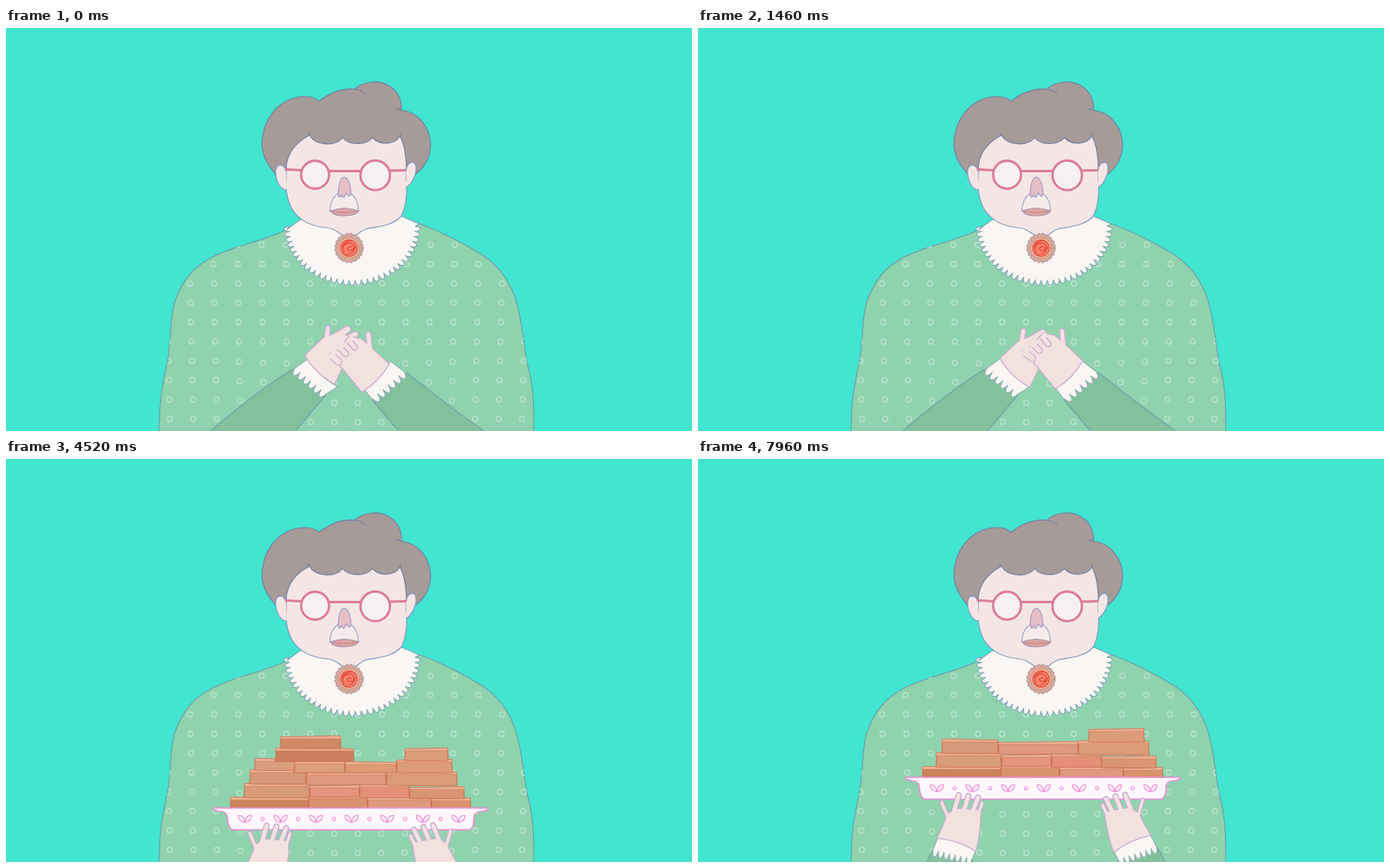
Recreate the animation shown at these times as an HTML page. Size 850 by 500 pixels, loop 8000 ms.

```html
<!DOCTYPE html>
<html lang="en">
<head>
<meta charset="utf-8">
<title>Lady with a tray</title>
<style>
html, body { margin: 0; width: 100%; height: 100%; overflow: hidden; background: #42e5d0; }
svg { display: block; width: 850px; height: 500px; }
</style>
</head>
<body>
<svg id="stage" viewBox="0 0 850 500" fill="none" stroke-linecap="round" stroke-linejoin="round"></svg>
<script>
const LOOP = 8000;
const SKIN = '#f3e1e0', LILAC = '#c6acd0', FACE = '#f5e6e5', SLEEVE = '#83c19d', HAIR = '#a69b99';
const EDGE = '#7f9ac0', SEAM = '#6c9fa8', CREAM = '#faf6f3', LACE = '#8fb0b5', PINK = '#ee8ad6';

const path = (d, fill = 'none', stroke = 'none', w = 1.2) =>
  `<path d="${d}" fill="${fill}" stroke="${stroke}" stroke-width="${w}"/>`;
const circle = (x, y, r, fill, stroke = 'none', w = 1.3) =>
  `<circle cx="${x}" cy="${y}" r="${r}" fill="${fill}" stroke="${stroke}" stroke-width="${w}"/>`;
const group = (id, inner) => `<g id="${id}">${inner}</g>`;

// Lobed edge: edge(u) gives a point and its outward normal.
function scallop(edge, teeth, depth) {
  const pts = [], n = teeth * 12;
  for (let i = 0; i <= n; i++) {
    const [x, y, nx, ny] = edge(i / n);
    const k = depth * Math.abs(Math.sin(Math.PI * i / 12)) ** .6;
    pts.push((x + nx * k).toFixed(1) + ',' + (y + ny * k).toFixed(1));
  }
  return 'L' + pts.join(' ');
}
function line(x1, y1, x2, y2) {
  const dx = x2 - x1, dy = y2 - y1, len = Math.hypot(dx, dy);
  return u => [x1 + dx * u, y1 + dy * u, -dy / len, dx / len];
}
const arc = (cx, cy, rx, ry, from, to) => u => {
  const a = from + (to - from) * u, c = Math.cos(a), s = Math.sin(a);
  return [cx + rx * c, cy + ry * s, c, s];
};

// Palm and fingers merged under one outline; a finger is [x1, y1, x2, y2, width].
function hand(palm, fingers) {
  const pass = (color, grow) => path(palm, color, grow ? color : 'none', grow) +
    fingers.map(([a, b, c, d, w]) => path(`M${a},${b}L${c},${d}`, 'none', color, w + grow)).join('');
  return pass(LILAC, 2.6) + pass(SKIN, 0);
}

const bodyPath = 'M190,502C189,455 197,432 201,408C205,380 203,362 209,340C219,312 232,297 254,285' +
  'C285,269 325,263 350,249L420,230L510,242C535,251 567,267 591,282C615,298 630,322 636,355' +
  'C642,382 642,402 648,425C654,448 654,475 654,502Z';

function dots() {
  let s = '';
  for (let row = 0; row < 10; row++) {
    const gap = 29.9 - .09 * row;
    for (let col = -8; col < 8; col++) {
      const x = 421.3 + gap * (col + .5);
      const bow = row > 5 ? 4 * Math.max(0, 1 - ((x - 421) / 160) ** 2) : 0;
      s += circle(x.toFixed(1), (269 + 24 * row + bow).toFixed(1), 3.2, 'none', '#b9e3cb', 1.4);
    }
  }
  return `<clipPath id="torso"><path d="${bodyPath}"/></clipPath><g clip-path="url(#torso)">${s}</g>`;
}

function lady() {
  const collar = 'M364,238L348,250' + scallop(arc(429, 246, 78, 67, Math.PI, 0), 33, 6.5) +
    'L512,243L489,233Z';
  const face = 'M347,172C346,186 346,202 350,214C355,233 372,246 398,248C411,249 414,258 425,261' +
    'C434,261 436,252 447,249C466,246 481,244 490,233C497,219 497,205 496.5,172L510,125H335Z';
  const hair = 'M334,181C320,166 315,150 318,134C323,104 345,85 371,85C380,85 385,88 388,91' +
    'C401,80 418,74 432,76C441,67 461,63 475,72C487,79 491,92 490,102C511,104 526,124 526,145' +
    'C526,161 518,173 508,181L496,190C497,165 495,146 488,134C482,145 463,146 454,136' +
    'C446,146 425,146 417,136C409,147 384,147 376,133C357,143 348,157 347,174L347,190Z';
  const ears = 'M347,178C345,168 335,167 334,178C334,190 340,201 348,201' +
    'M496,176C497,166 507,163 508,172C509,182 503,193 496,198';
  const brooch = 'M443,273' + scallop(arc(425, 273, 15.5, 16, 0, 2 * Math.PI), 20, 2.4) + 'Z';
  const glasses = '#dc7b9b';
  return path(bodyPath, '#8fd3ae', SEAM) + dots() +
    path(collar, CREAM, '#7fa6b8', 1.1) +
    path(face, FACE, EDGE) + path(hair, HAIR, '#71809f') + path(ears, FACE, EDGE) +
    path('M432,76Q441,77 445,82M490,102Q486,100 483,101M376,133L374,130M488,134L489,131', 'none', '#71809f') +
    path('M347,175.5L366,176.5M400,177.5H439M476,177L495,176.5', 'none', glasses, 2.8) +
    circle(383, 182, 17.3, '#f7f0f2', glasses, 2.9) + circle(457.5, 182.8, 18.3, '#f7f0f2', glasses, 2.9) +
    path('M412,205C404,210 402,218 401,227Q419,222 437,227C436,217 434,210 427,205Z', '#f6ebea', '#94a6c6', 1.1) +
    path('M412,208C411,195 415,185 419,185C425,186 428,198 427,207Q425,211 423,206Q421,203 420,208' +
      'Q418,213 416,207Q413,212 412,208Z', '#e7bfc6', '#9799c0', 1.1) +
    path('M402,227Q419,220 437,227Q433,233 419,233Q405,233 402,227Z', '#e0a4a1', '#9b93ae', 1.1) +
    path('M403,227Q419,231 436,227', 'none', '#b98390', .9) +
    path(brooch, '#d7a99a', '#a98f9c', 1) +
    circle(425, 273, 13, '#efb89b', '#c98f80', .9) +
    circle(425, 273, 10.2, '#f8826a', '#e2503f', 1.2) +
    path('M419,279C415,271 420,266 427,267C434,269 432,277 425,276C421,275 424,270 428,272' +
      'M421,281Q431,281 433,271M417,271Q420,264 428,264', 'none', '#df463a', 1.2);
}

function foldedHands() {
  const cuffL = 'M375,410L356,423' + scallop(line(358, 422, 397, 454), 6, 8) + 'L411,445Q387,432 375,410Z';
  const cuffR = 'M443,447L453,460' + scallop(line(454, 460, 493, 426), 6, 8) + 'L476,413Q463,435 443,447Z';
  const left = hand('M375,410L397,389L422,379L432,400L411,445Q387,432 375,410Z',
    [[401, 391, 403, 376, 5], [410, 388, 427, 378, 7], [422, 392, 437, 384, 6]]);
  const right = hand('M476,413L457,395L442,382L428,379L406,402L443,447Q463,435 476,413Z',
    [[453, 396, 451, 376, 5]]) +
    [[406, 403, 414, 410, 7], [416, 393, 423, 400, 6], [428, 385, 434, 392, 5.5]]
      .map(f => hand('', [f])).join('') +
    path('M409,399L404,403M419,389L414,393M430,381L427,384', 'none', SKIN, 6);
  return path('M250,503Q308,453 354,424L396,456L356,503', SLEEVE, SEAM) +
    path('M596,503Q544,466 497,428L454,462L489,503', SLEEVE, SEAM) +
    path(cuffL, CREAM, LACE) + path(cuffR, CREAM, LACE) +
    group('leftHand', left) + group('rightHand', right);
}

// x, y, width, height, color, time of disappearing
const bricks = [
  [278, 382, 97, 14, '#cb835c'], [375, 380, 73, 15, '#d8936d'], [448, 382, 79, 14, '#e09b7c'], [527, 383, 49, 13, '#d9926b'],
  [295, 365, 81, 17, '#d99c78'], [376, 367, 62, 14, '#e4957c'], [438, 366, 62, 16, '#e39076'], [500, 369, 68, 14, '#d99673'],
  [302, 348, 70, 17, '#d59a78'], [372, 351, 99, 15, '#df9882'], [471, 350, 88, 17, '#da9b76'],
  [484, 335, 69, 16, '#db9d79'], [308, 334, 52, 14, '#da9f7c', 7780], [357, 337, 63, 14, '#db9f79', 7870],
  [420, 338, 64, 13, '#dc9b72', 7960], [494, 321, 54, 15, '#db9d79', 7690],
  [334, 321, 97, 16, '#cb7f5d', 7490], [340, 306, 75, 15, '#cf8a65', 7290]
];

function brick([x, y, w, h, color], i) {
  const tilt = i % 2 ? .5 : -.5, r = x + w, b = y + h;
  const top = `M${x + 1},${y + tilt}Q${x + w / 2},${y + .5} ${r - 1},${y - tilt}`;
  return group('brick' + i,
    path(`${top}L${r},${b}Q${x + w / 2},${b + .5} ${x},${b}Z`, color, '#cf7053', 1.1) +
    path(`${top}L${r},${y + 3}L${x},${y + 3}Z`, '#ecb697', '#d07c5e', .7));
}

function trayHand() {
  const hem = scallop(line(291, 485, 340, 496), 7, 8);
  return path('M281,510Q284,497 291,485L340,496L341,510Z', SLEEVE, SEAM) +
    path('M297,470L291,485' + hem + 'L344,486Q322,472 297,470Z', CREAM, LACE) +
    hand('M297,470Q306,452 309,441L320,434L350,436Q350,462 344,486Q322,472 297,470Z',
      [[309, 443, 302, 426, 3.5], [317, 438, 323, 417, 5], [328, 441, 335, 418, 5],
       [339, 441, 347, 420, 5], [347, 442, 352, 427, 3.5]]);
}

function tray() {
  let s = path('M257,395H597Q598,398 591,399Q582,399 580,405Q580,422 573,422H282Q275,422 274,405' +
    'Q272,399 264,399Q257,398 257,395Z', '#fef8fc', PINK, 1.7);
  for (let i = 0; i < 7; i++) {
    const x = 296 + 44.1 * i;
    s += path(`M${x},413Q${x - 9},411 ${x - 8},404Q${x - 1},404 ${x},413Q${x + 1},404 ${x + 8},404Q${x + 9},411 ${x},413Z`,
      '#fdeef8', PINK, 1.1);
    if (i < 6) s += circle(x + 22, 408.5, 2, 'none', PINK, 1.1);
  }
  return bricks.map(brick).join('') + s + trayHand() +
    `<g transform="rotate(-6 525 425) translate(853 0) scale(-1 1)">${trayHand()}</g>`;
}

const stage = document.getElementById('stage');
stage.innerHTML = '<rect width="850" height="500" fill="#42e5d0"/>' + lady() +
  group('folded', foldedHands()) + group('tray', tray());

const $ = id => document.getElementById(id);
const move = (id, x, y) => $(id).setAttribute('transform', `translate(${x.toFixed(2)} ${y.toFixed(2)})`);
// Value held since `start`, changing every `gap` ms.
const stepped = (t, start, gap, values) =>
  values[Math.max(0, Math.min(values.length - 1, Math.floor((t - start) / gap) + 1))];

const sink = [0, 32, 64, 96, 128, 165];
const rise = [220, 188, 168, 145, 120, 92, 64, 38, 18, 5, 0];

function draw(t) {
  const k = Math.max(0, Math.min(16, Math.floor((t - 500) / 60))) / 16;
  const open = 1 - k * k * (3 - 2 * k);
  move('leftHand', -4 * open, -4 * open);
  move('rightHand', -2 * open, 4 * open);
  move('folded', 0, stepped(t, 3460, 80, sink));
  move('tray', 0, stepped(t, 3980, 90, rise));
  bricks.forEach((b, i) => {
    if (b[5]) $('brick' + i).setAttribute('visibility', t < b[5] ? 'visible' : 'hidden');
  });
}

const began = performance.now();
function tick() {
  draw((performance.now() - began) % LOOP);
  requestAnimationFrame(tick);
}
tick();
</script>
</body>
</html>
```
